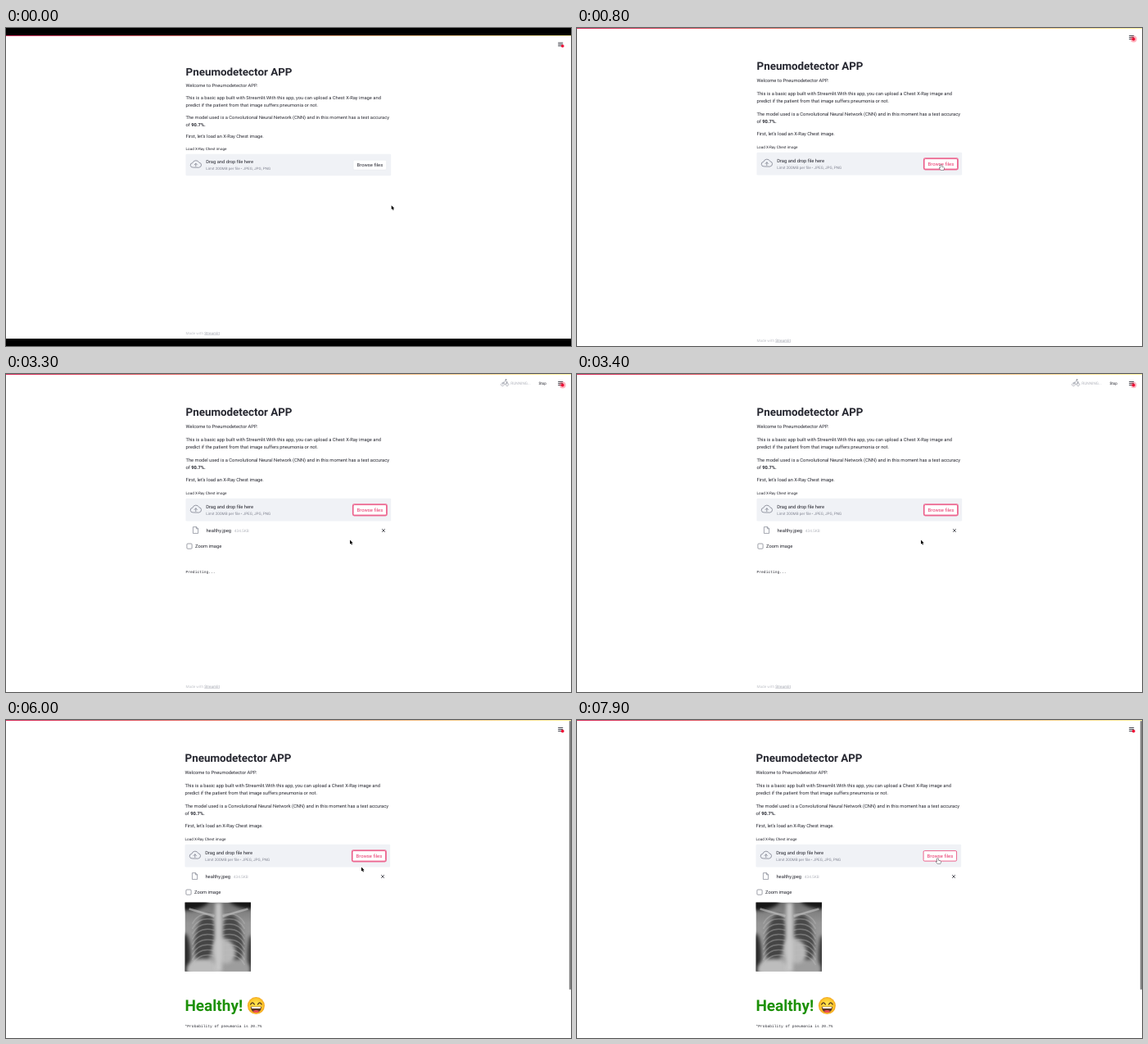
Write an HTML page with a canvas that moves like this. It is 690 by 388 pixels and loops after 8 s.

```html
<!DOCTYPE html>
<html lang="en">
<head>
<meta charset="utf-8">
<title>Pneumodetector APP</title>
<style>
  html, body { margin: 0; width: 100%; height: 100%; overflow: hidden; background: #fff; }
  canvas { display: block; width: 690px; height: 388px; }
</style>
</head>
<body>
<canvas id="stage"></canvas>
<script>
const W = 690, H = 388, LOOP = 8000, STEP = 100;
const INK = '#262730', GREY = '#858895', PALE = '#b4b6be', PINK = '#e8336a';
const SANS = 'Roboto, "Open Sans", sans-serif', MONO = '"Liberation Mono", monospace';
const canvas = document.getElementById('stage');
const c = canvas.getContext('2d');
const dpr = window.devicePixelRatio || 1;
canvas.width = W * dpr;
canvas.height = H * dpr;

// time, x, y of the pointer tip
const PATH = [
  [0, 470.7, 216.5], [200, 470.7, 216.5], [400, 461, 192], [600, 444, 166.5],
  [2500, 444, 166.5], [2700, 440, 176], [3200, 420, 202.5], [3400, 420, 202.5],
  [4200, 298.5, 234.5], [4300, 298.5, 234.5], [4500, 250, 270], [4700, 226, 320],
  [4900, 228, 345], [5100, 240, 346], [5200, 258, 330], [5300, 420, 200],
  [5500, 420, 200], [6000, 434, 179.5], [6300, 436, 178], [6600, 440, 168.5], [8000, 440, 168.5]
];
// time, strength of the glow around the recording dot
const GLOW = [[0, 0], [200, 0], [600, 1], [1200, 1], [1400, .7], [1800, .85], [2500, .85],
  [2900, .6], [3300, 1], [4200, 0], [8000, 0]];

function track(keys, t, k) {
  let i = 1;
  while (i < keys.length - 1 && keys[i][0] < t) i++;
  const a = keys[i - 1], b = keys[i];
  const p = Math.min(1, Math.max(0, (t - a[0]) / (b[0] - a[0])));
  return a[k] + (b[k] - a[k]) * p;
}

function text(s, x, y, size = 5.77, color = INK, weight = 400, family = SANS) {
  c.font = `${weight} ${size}px ${family}`;
  c.fillStyle = color;
  c.fillText(s, x, y);
  return c.measureText(s).width;
}

function rect(x, y, w, h, color) {
  c.fillStyle = color;
  c.fillRect(x, y, w, h);
}

function box(x, y, w, h, r, fill, line, width) {
  c.beginPath();
  c.roundRect(x, y, w, h, r);
  if (fill) { c.fillStyle = fill; c.fill(); }
  if (line) { c.strokeStyle = line; c.lineWidth = width; c.stroke(); }
}

function oval(x, y, rx, ry, color, turn = 0) {
  c.beginPath();
  c.ellipse(x, y, rx, ry, turn, 0, 7);
  c.fillStyle = color;
  c.fill();
}

function path(d, x, y, fill, line, width = .6) {
  const p = new Path2D(d);
  c.save();
  c.translate(x, y);
  c.lineJoin = c.lineCap = 'round';
  if (line) { c.strokeStyle = line; c.lineWidth = width; c.stroke(p); }
  if (fill) { c.fillStyle = fill; c.fill(p); }
  c.restore();
}

function header(t, running) {
  const g = c.createLinearGradient(0, 0, W, 0);
  g.addColorStop(0, '#d8325f');
  g.addColorStop(.5, '#ee9a78');
  g.addColorStop(1, '#fdf3a0');
  rect(0, 0, W, 1, g);
  if (running) {
    path('M-2.6 0a1.9 1.9 0 1 0 .01 0M3 0a1.9 1.9 0 1 0 .01 0M-2.6 1.9L-1-1L.6 1.8M-1-1L1-3L2 -1L3.6 -1M2 -1L3 1.9',
      609, 10.8, null, GREY, .55);
    oval(610.6, 6.9, .9, .9, GREY);
    text('RUNNING...', 616.3, 12.7, 4.75, PALE);
    text('Stop', 650.4, 12.7, 4.65);
  }
  for (let i = 0; i < 3; i++) rect(674.2, 9 + i * 2, 6, 1, '#44454e');
  const glow = track(GLOW, t, 1);
  if (glow) oval(679.8, 13.5, 2 + 1.9 * glow, 2 + 1.9 * glow, `rgba(255,40,70,${.35 * glow})`);
  oval(679.7, 13.6, 1.9, 1.9, '#ef0c34');
}

function intro() {
  text('Pneumodetector APP', 219.5, 51.4, 13.4, INK, 700);
  text('Welcome to Pneumodetector APP.', 219.5, 66.2);
  text('This is a basic app built with Streamlit.With this app, you can upload a Chest X-Ray image and', 219.5, 81.8);
  text('predict if the patient from that image suffers pneumonia or not.', 219.5, 91.2);
  text('The model used is a Convolutional Neural Network (CNN) and in this moment has a test accuracy', 219.5, 106.6);
  const w = text('of ', 219.5, 116);
  text('90.7%.', 219.5 + w, 116, 5.77, INK, 700);
  text("First, let's load an X-Ray Chest image.", 219.5, 131.3);
  text('Load X-Ray Chest image', 219.5, 147, 4.63);
}

function uploader(hover, focus) {
  box(219.5, 151.8, 250.7, 27.8, 1.4, '#f0f2f6');
  path('M-3.4 3.8a2.9 2.9 0 0 1-.5-5.8a4.2 4.2 0 0 1 7.9-.5a3.2 3.2 0 0 1 .2 6.3zM0 2.4V-1.2M-1.6 .3L0-1.4L1.6 .3',
    231.8, 165.2, null, GREY, .85);
  text('Drag and drop file here', 244.2, 164.1);
  text('Limit 200MB per file • JPEG, JPG, PNG', 244.2, 172.3, 4.68, GREY);
  const lit = hover || focus;
  if (focus) box(423.5, 158.9, 41.8, 13.9, 1.8, null, 'rgba(238,70,120,.75)', 1.2);
  box(424.1, 159.6, 40.5, 12.5, 1.4, '#fff', lit ? PINK : '#e3e5ea', lit ? .75 : .4);
  text('Browse files', 428.6, 167.8, 5.83, lit ? PINK : INK);
}

function fileRow() {
  path('M-2.8-3.9H.8L3-1.7V3.9H-2.8zM.8-3.9V-1.7H3', 231.6, 190.5, null, GREY, .75);
  text('healthy.jpeg', 244.4, 192.5);
  text('434.5KB', 278.8, 192.5, 4.75, PALE);
  path('M-1.6-1.6L1.6 1.6M1.6-1.6L-1.6 1.6', 461, 190.9, null, INK, .8);
}

function options() {
  box(220.9, 207, 6.2, 6.2, 1, '#fff', '#777a86', .7);
  text('Zoom image', 231, 212, 5.75);
}

// chest picture as soft tones
function chest() {
  const x = 219.5, y = 222.6, w = 80.5, h = 84.2;
  c.save();
  c.beginPath();
  c.rect(x, y, w, h);
  c.clip();
  c.translate(x, y);
  const g = c.createLinearGradient(0, 0, 0, h);
  g.addColorStop(0, '#6f6f6f');
  g.addColorStop(.3, '#949494');
  g.addColorStop(1, '#a6a6a6');
  rect(0, 0, w, h, g);
  c.filter = 'blur(2px)';
  oval(10, 0, 20, 9, '#161616', -.2);
  oval(72, 0, 18, 7, '#161616', .2);
  oval(0, 66, 7, 28, '#2c2c2c');
  oval(81, 66, 5, 26, '#3a3a3a');
  oval(24, 45, 12, 31, '#454545', .14);
  oval(59, 44, 12, 30, '#484848', -.14);
  oval(21, 82, 19, 13, '#bdbdbd');
  oval(61, 81, 18, 11, '#9d9d9d');
  oval(48, 59, 13, 16, '#b8b8b8', -.5);
  rect(37, 0, 8, h, '#c9c9c9');
  c.filter = 'blur(.6px)';
  c.lineWidth = 1.5;
  c.strokeStyle = 'rgba(190,190,190,.4)';
  for (let i = 0; i < 9; i++) {
    const top = 15 + i * 6.3;
    for (const s of [-1, 1]) {
      c.beginPath();
      c.moveTo(41 + s * 5, top);
      c.quadraticCurveTo(41 + s * 24, top - 5, 41 + s * 32, top + 11);
      c.stroke();
    }
  }
  c.lineWidth = 2.6;
  c.strokeStyle = 'rgba(200,200,200,.6)';
  for (const s of [-1, 1]) {
    c.beginPath();
    c.moveTo(41 + s * 5, 17);
    c.quadraticCurveTo(41 + s * 18, 13, 41 + s * 36, 8);
    c.stroke();
  }
  c.restore();
}

function emoji(x, y) {
  const g = c.createRadialGradient(x, y - 2, 2, x, y, 10.6);
  g.addColorStop(0, '#ffdf4a');
  g.addColorStop(.7, '#fcc72c');
  g.addColorStop(1, '#f2a322');
  oval(x, y, 10.5, 10.5, g);
  for (const s of [-4.4, 4.4])
    path('M-2.3 1Q0-3.4 2.3 1', x + s, y - 2.6, null, '#4a3020', 1.3);
  path('M-6.6 0H6.6Q6.2 7.2 0 7.2T-6.6 0z', x, y + 1.2, '#5a3526');
  path('M-5.8 .2H5.8L5.1 2.3H-5.1z', x, y + 1.2, '#fff');
  oval(x, y + 6.8, 3.3, 1.5, '#ee4b52');
}

function result() {
  text('Healthy!', 219.4, 355, 19, '#1d9108', 700);
  emoji(306.4, 348.6);
  text('*Probability of pneumonia is 20.7%', 219.6, 374.6, 4.6, INK, 400, MONO);
}

function footer() {
  const w = text('Made with ', 219.5, 382.6, 4.66, '#c3c5cb');
  const u = text('Streamlit', 219.5 + w, 382.6, 4.66, '#a3a6b0');
  rect(219.5 + w, 383.2, u, .4, '#a3a6b0');
}

function pointer(x, y, hand) {
  if (hand)
    path('M0 .4Q.7-.4 1.3 .5V3L3.6 3.5Q4.3 3.7 4.2 4.5L3.6 7H.4L-1.6 4.5Q-1.5 3.6-.8 4L0 4.5z', x, y, '#fff', '#33343c', .9);
  else
    path('M0 0V5.1L1.2 4.1L2 6L2.9 5.6L2.1 3.8H3.7z', x, y, '#000', '#fff', .8);
}

function draw(t) {
  const boxed = t < 200;
  const hasFile = t >= 2700, hasOptions = t >= 2900, hasImage = t >= 3500, done = t >= 3900;
  const x = track(PATH, t, 1), y = track(PATH, t, 2);
  const hover = x > 423 && x < 465 && y > 158 && y < 173;
  const focus = (t >= 800 && t < 1000) || (t >= 2600 && t < 7300);

  c.setTransform(dpr, 0, 0, dpr, 0, 0);
  c.textRendering = 'geometricPrecision';
  rect(0, 0, W, H, boxed ? '#000' : '#fff');
  c.save();
  if (boxed) {
    c.translate(0, 9);
    c.scale(1, 370 / H);
    rect(0, 0, W, H, '#fff');
  }
  header(t, hasFile && t < 4000);
  c.save();
  if (hasImage) c.translate(-1, 0);
  intro();
  uploader(hover, focus);
  if (hasFile) fileRow();
  if (hasOptions) options();
  if (hasOptions && !done) text('Predicting...', 219.6, hasImage ? 327 : 243, 4.6, INK, 400, MONO);
  if (hasImage) chest();
  if (done) result();
  if (!hasImage) footer();
  c.restore();
  if (hasImage) box(687.8, 1, 2.2, done ? 328 : 355, 1, '#858585');
  c.restore();
  pointer(x, y, hover);
}

const start = performance.now();
function frame(now) {
  const t = Math.max(0, now - start) % LOOP;
  draw(Math.floor(t / STEP) * STEP);
  requestAnimationFrame(frame);
}
draw(0);
requestAnimationFrame(frame);
</script>
</body>
</html>
```
